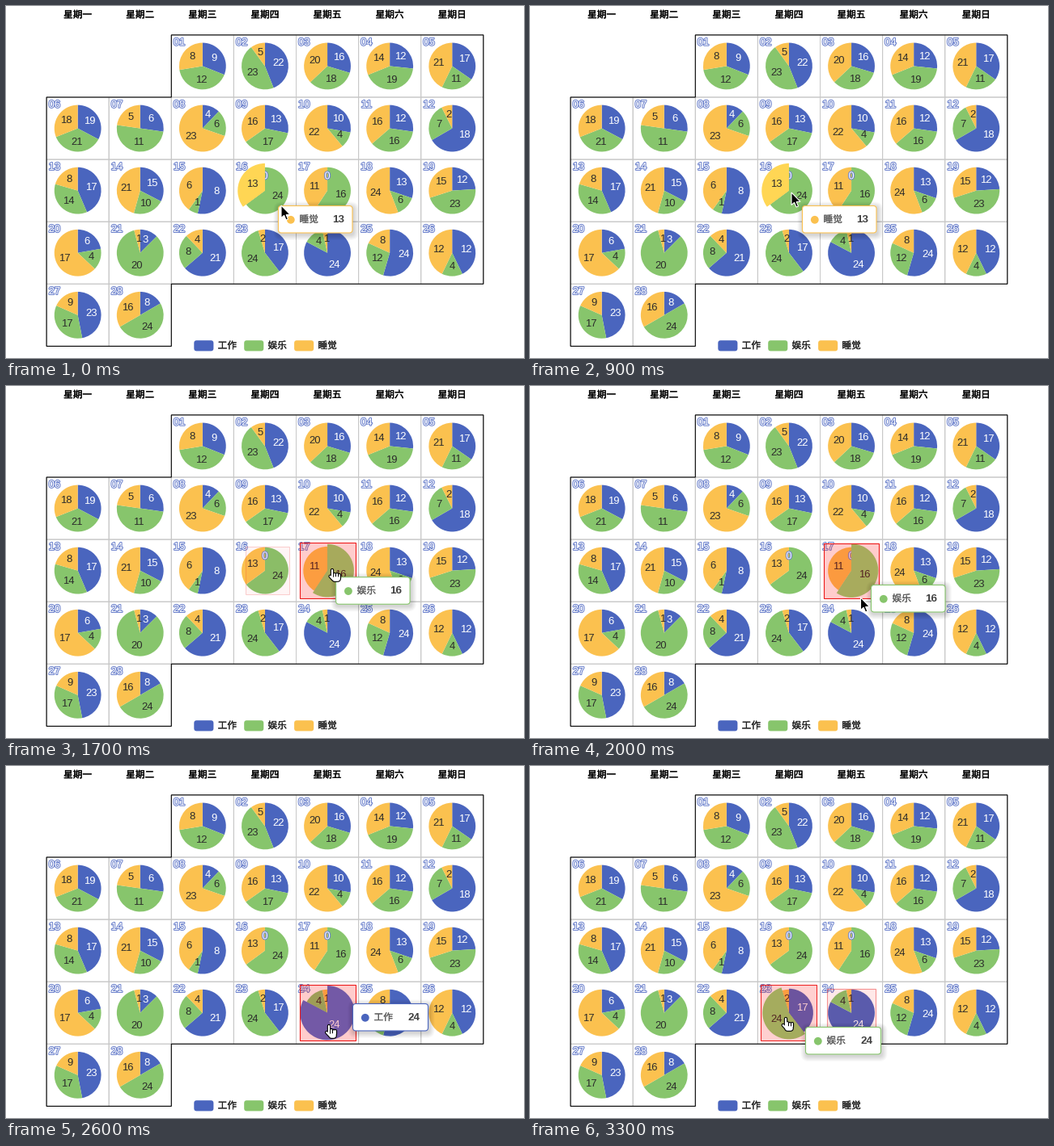
Animation of 640x436 px, one loop 3400 ms. Source, as a matplotlib script:

```python
from itertools import groupby

import numpy as np
import matplotlib.pyplot as plt
from matplotlib.animation import FuncAnimation
from matplotlib.colors import to_rgb
from matplotlib.patches import Circle, FancyBboxPatch, Polygon, Rectangle, Wedge
from matplotlib.patheffects import withStroke

W, H, DPI = 640, 436, 100
FRAMES, STEP = 34, 100
LOOP = FRAMES * STEP
X0, Y0, CELL = 50.1, 35.9, 77.1
RADIUS, GROW = 28.9, 4.8
LABEL_R = 0.6 * RADIUS
CJK, SANS = "Noto Sans CJK JP", "Liberation Sans"

WORK, FUN, SLEEP = range(3)
NAMES = ["工作", "娱乐", "睡觉"]
COLORS = ["#4a65be", "#87c56c", "#fbc14f"]
LIFTED = ["#5170d0", "#94d876", "#ffd654"]
INK = ["white", "#2b2b2b", "#2b2b2b"]

# Hours shown on each day: work, fun, sleep
DAYS = [
    (9, 12, 8), (22, 23, 5), (16, 18, 20), (12, 19, 14), (17, 11, 21),
    (19, 21, 18), (6, 11, 5), (4, 6, 23), (13, 17, 16), (10, 4, 22),
    (12, 16, 16), (18, 7, 2), (17, 14, 8), (15, 10, 21), (8, 1, 6),
    (0, 24, 13), (0, 16, 11), (13, 6, 24), (12, 23, 15), (6, 4, 17),
    (3, 20, 1), (21, 8, 4), (17, 24, 2), (24, 4, 1), (24, 12, 8),
    (12, 4, 12), (23, 17, 9), (8, 24, 16),
]

# Mouse path: ms, x, y. Hovers, repaints and the tooltip all follow from it.
MOUSE = np.array([
    (600, 340, 247), (900, 323, 231), (1100, 335, 233), (1200, 363, 232),
    (1400, 389.5, 217), (1800, 408, 230), (2000, 408.5, 262),
    (2200, 409, 284), (2400, 415, 278), (2600, 399, 321),
    (2820, 383, 304), (3000, 324, 310), (3100, 327, 307), (3300, 315.5, 312)])
WAKE = 900  # the chart starts to react
LIFT, FADE, LINGER, LAG = 300, 420, 190, 200

fig = plt.figure(figsize=(W / DPI, H / DPI), dpi=DPI, facecolor="white")
ax = fig.add_axes([0, 0, 1, 1])
ax.set(xlim=(0, W), ylim=(H, 0))
ax.axis("off")


def px(n):
    return n * 72 / DPI


def text(x, y, s, size=13, font=SANS, ha="center", **kw):
    return ax.text(x, y, s, fontsize=px(size), fontname=font, ha=ha,
                   va="center", **kw)


def cjk(x, y, s, color, ha="center", **kw):
    thicken = [withStroke(linewidth=px(0.3), foreground=color)]
    return text(x, y, s, 11.7, CJK, ha, color=color, path_effects=thicken, **kw)


def outlined(x, y, s, z):
    return text(x, y, s, color="white", zorder=z,
                path_effects=[withStroke(linewidth=px(2), foreground="#6a80cc")])


def box(x, y, w, h, r, **kw):
    style = f"round,pad=0,rounding_size={r}"
    return ax.add_patch(FancyBboxPatch((x, y), w, h, boxstyle=style, **kw))


def corner(day):
    row, col = divmod(day + 1, 7)
    return X0 + col * CELL, Y0 + row * CELL


def center(day):
    return np.add(corner(day), CELL / 2)


def edges(day):
    hours = DAYS[day - 1]
    return np.cumsum((0,) + hours) / sum(hours) * 360


def span(day, k):
    return edges(day)[k:k + 2] - 90


def wedge(day, k, r, color, z):
    return ax.add_patch(Wedge(center(day), r, *span(day, k), fc=color, lw=0, zorder=z))


def value_label(day, k, z):
    value = DAYS[day - 1][k]
    a = np.radians(span(day, k).mean())
    x, y = center(day) + LABEL_R * np.array([np.cos(a), np.sin(a)])
    if value == 0:
        return outlined(x, y, "0", z)
    return text(x, y, str(value), color=INK[k], zorder=z)


def draw_calendar():
    for i, c in enumerate("一二三四五六日"):
        cjk(X0 + (i + 0.5) * CELL, 11, "星期" + c, "black")
    for day in range(1, len(DAYS) + 1):
        x, y = corner(day)
        ax.add_patch(Rectangle((x, y), CELL, CELL, fc="none", ec="#c8c8c8",
                               lw=px(1), snap=False, zorder=1))
        outlined(x + 9.8, y + 9.8, f"{day:02d}", 3)
        for k in range(3):
            if DAYS[day - 1][k]:
                wedge(day, k, RADIUS, COLORS[k], 2)
            value_label(day, k, 4)
    grid = [(2, 0), (7, 0), (7, 4), (2, 4), (2, 5), (0, 5), (0, 1), (2, 1)]
    outline = [(X0 + c * CELL, Y0 + r * CELL) for c, r in grid]
    ax.add_patch(Polygon(outline, fc="none", ec="black", lw=px(1.1), snap=False,
                         zorder=1.5))
    for k, name in enumerate(NAMES):
        x = 232.3 + 61.9 * k
        box(x, 414.2, 24.1, 13.2, 3.3, fc=COLORS[k], lw=0)
        cjk(x + 29.3, 420.8, name, "#222222", "left")


def mouse(t):
    return np.array([np.interp(t, MOUSE[:, 0], MOUSE[:, i]) for i in (1, 2)])


def hit(p):
    for day in range(1, len(DAYS) + 1):
        dx, dy = p - center(day)
        if np.hypot(dx, dy) < RADIUS + GROW:
            angle = np.degrees(np.arctan2(dx, -dy)) % 360
            return day, int(np.searchsorted(edges(day)[1:], angle, side="right"))
    return None


def record_hovers():
    """List (day, slice, start, end) for each slice the mouse rests on."""
    log, now, since = [], (16, SLEEP), -LOOP
    for t in range(WAKE + 10, LOOP, 10):
        found = hit(mouse(t))
        if found != now:
            if now:
                log.append((*now, since, t))
            now, since = found, t
    if now:
        log.append((*now, since, 2 * LOOP))
    return log


def ease(u):
    return 1 - (1 - np.clip(u, 0, 1)) ** 3


def lift(t, on, off):
    return ease((t - on) / LIFT) - ease((t - off) / LIFT)


def mix(a, b, u):
    a, b = np.array(to_rgb(a)), np.array(to_rgb(b))
    return tuple(a + (b - a) * u)


def draw_hovers(t):
    for day, k, on, off in HOVERS:
        u = lift(t, on, off)
        if u > 0.01:
            color = mix(COLORS[k], LIFTED[k], u)
            yield wedge(day, k, RADIUS + GROW * u, color, 5 + u / 10)
            yield value_label(day, k, 6)


def slice_points(day, k, r):
    a = np.radians(np.linspace(*span(day, k), 60))
    rim = center(day) + r * np.column_stack([np.cos(a), np.sin(a)])
    return np.vstack([center(day), rim])


def draw_repaints(t):
    """Flash a red box around the slices of a day that have been redrawn."""
    for day, group in groupby(HOVERS[1:], key=lambda h: h[0]):
        group = list(group)
        on, off = group[0][2], group[-1][3]
        alpha = np.clip(min((t - on) / FADE, 1 - (t - off - LINGER) / FADE), 0, 1)
        if alpha == 0:
            continue
        r = RADIUS + GROW * lift(t, on - LIFT, off)
        points = np.vstack([slice_points(day, h[1], r) for h in group if h[2] <= t])
        low, high = points.min(0) - 0.8, points.max(0) + 0.8
        yield ax.add_patch(Rectangle(
            low, *(high - low), fc=(1, 0, 0, 0.2 * alpha),
            ec=(0.93, 0.1, 0.1, alpha), lw=px(1.1), zorder=7))


def draw_tooltip(t):
    day, k = [h[:2] for h in HOVERS if h[2] <= t][-1]
    value = DAYS[day - 1][k]
    x, y = mouse(max(t - LAG, WAKE)) + (13.5, 16.5)
    w, h = 93 - 1.5 * str(value).count("1"), 33.5
    for g in range(1, 8):
        yield box(x + 1 - g, y + 2 - g, w + 2 * g, h + 2 * g, 3 + g,
                  fc=(0, 0, 0, 0.022), lw=0, zorder=8)
    yield box(x, y, w, h, 3.8, fc="white", ec=COLORS[k], lw=px(1.1), zorder=8.1)
    yield ax.add_patch(Circle((x + 15.3, y + 17.3), 4.9, fc=COLORS[k], lw=0, zorder=8.2))
    yield cjk(x + 26, y + 17, NAMES[k], "#606060", "left", zorder=8.2)
    yield text(x + w - 10, y + 17.2, str(value), 13.4, ha="right", weight="bold",
               color="#404040", zorder=8.2)


def draw_hand(p):
    """A pointing hand: fat round strokes in black, then thinner in white."""
    knuckles = [(x, 6 + x / 8, x, 11, 2) for x in (2.9, 5.6, 8.2)]
    strokes = [(0, 1.2, 0, 11, 2.2), (-2.8, 9, 0.5, 12.5, 2.2),
               (2.6, 12.6, 6.4, 12.6, 5.6)] + knuckles
    for extra, color, z in ((2.2, "black", 9), (0, "white", 9.1)):
        for x0, y0, x1, y1, w in strokes:
            yield ax.plot([p[0] + x0, p[0] + x1], [p[1] + y0, p[1] + y1], color=color,
                          lw=px(w + extra), solid_capstyle="round", zorder=z)[0]


def draw_cursor(t):
    p = mouse(t)
    if t > WAKE and hit(p):
        yield from draw_hand(p)
        return
    arrow = [(0, 0), (0, 15.5), (3.6, 12.3), (6, 18), (8.5, 17), (6.1, 11.5), (11, 11.3)]
    yield ax.add_patch(Polygon(arrow + p, fc="black", ec="white", lw=px(1.1), zorder=9))


moving = []


def update(i):
    t = i * STEP
    while moving:
        moving.pop().remove()
    for draw in (draw_hovers, draw_repaints, draw_tooltip, draw_cursor):
        moving.extend(draw(t))
    return moving


HOVERS = record_hovers()
draw_calendar()
anim = FuncAnimation(fig, update, frames=FRAMES, interval=STEP,
                     init_func=lambda: update(0), repeat=True, repeat_delay=0)
plt.show()
```
